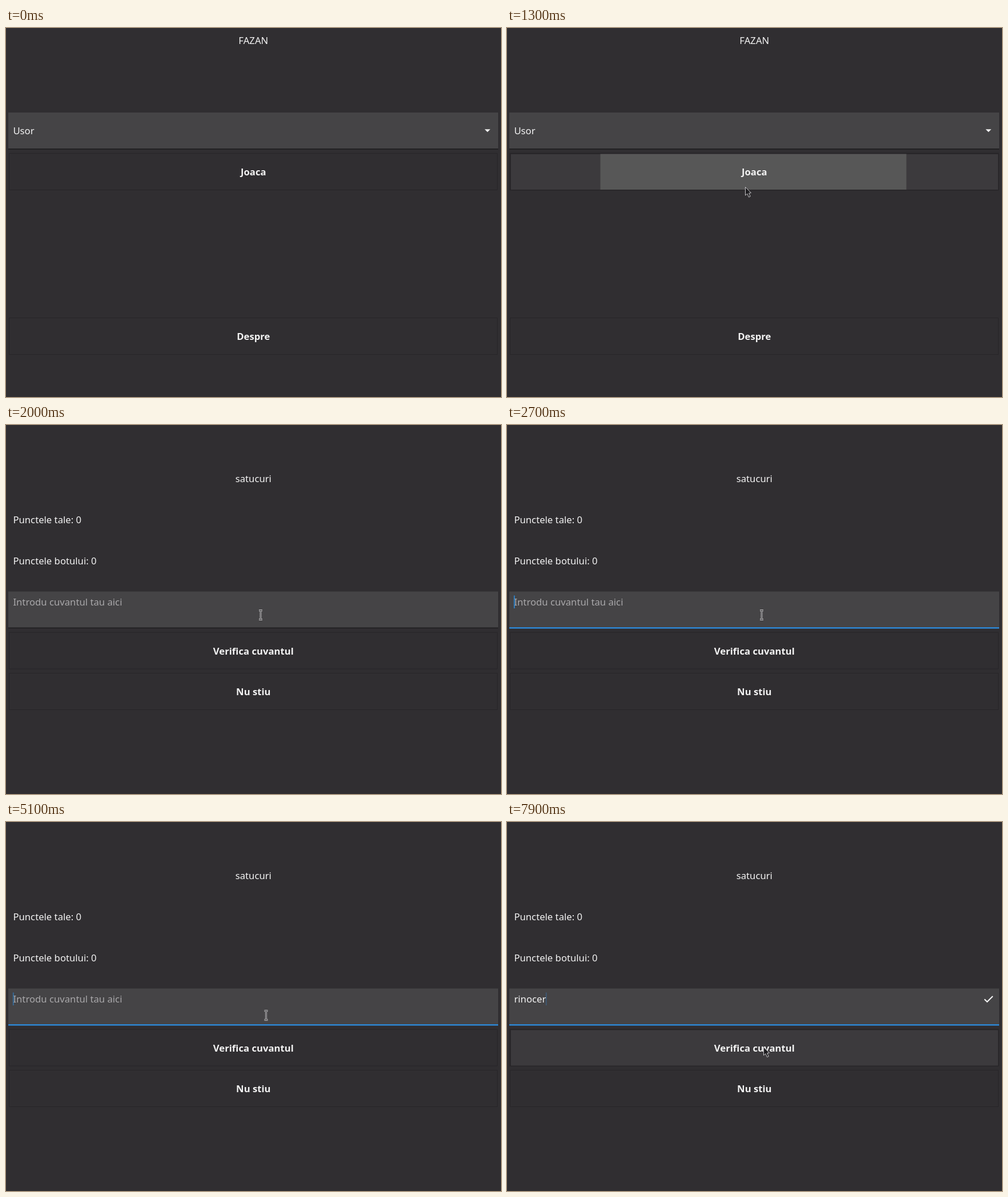
An HTML page with a canvas for the animation above (8 s loop, 867 px wide and 646 px high).

```html
<!DOCTYPE html>
<html lang="ro">
<head>
<meta charset="utf-8">
<title>Joc de cuvinte</title>
<style>
  html, body { margin: 0; width: 100%; height: 100%; overflow: hidden; background: #302e31; }
  canvas { display: block; }
</style>
</head>
<body>
<canvas id="stage" width="867" height="646"></canvas>
<script>
const ctx = document.getElementById('stage').getContext('2d');
const LOOP = 8000, STEP = 100;
const FONT_SIZE = 16.7, TEXT_X = 12.4;
const COLOR = {
  page: '#302e31', field: '#454446', hover: '#3c3a3d', ripple: '#575757',
  border: '#272528', line: '#1e1d1f', text: '#f3f3f3', hint: '#a9a8aa', accent: '#2b90e6'
};

// Pointer stops: [time, x, y]
const POINTER = [
  [300, 538, 429], [900, 417.5, 278.5], [1400, 417.5, 278.5], [2000, 446, 332.5],
  [2700, 446, 332.5], [3100, 455.5, 338.5], [7300, 455.5, 338.5], [7800, 449.5, 394]
];
// Times at which each letter of the word is typed
const WORD = 'rinocer';
const KEYS = [5500, 5800, 6400, 6500, 6600, 6700, 6900];
const GAME_START = 1400, FOCUS = 2300, FADE_RESUME = 7230;

const easeInOut = p => p < 0.5 ? 2 * p * p : 1 - 2 * (1 - p) * (1 - p);

function pointerAt(t) {
  if (t < POINTER[0][0]) return null;
  const next = POINTER.findIndex(stop => stop[0] > t);
  if (next < 0) return POINTER[POINTER.length - 1].slice(1);
  const [t0, x0, y0] = POINTER[next - 1], [t1, x1, y1] = POINTER[next];
  const p = easeInOut((t - t0) / (t1 - t0));
  return [x0 + (x1 - x0) * p, y0 + (y1 - y0) * p];
}

function rect(x, y, w, h, color) {
  ctx.fillStyle = color;
  ctx.fillRect(x, y, w, h);
}

function text(str, baseline, { x = TEXT_X, align = 'left', weight = 400, color = COLOR.text } = {}) {
  ctx.font = `${weight} ${FONT_SIZE}px "Noto Sans", sans-serif`;
  ctx.textAlign = align;
  ctx.fillStyle = color;
  ctx.fillText(str, x, baseline);
}

const centered = (str, baseline, weight) => text(str, baseline, { x: 433.3, align: 'center', weight });

function stroke(path, color, width) {
  ctx.strokeStyle = color;
  ctx.lineWidth = width;
  ctx.stroke(new Path2D(path));
}

function button(label, y, pointer, rippleOn) {
  const hovered = pointer && pointer[1] > y && pointer[1] < y + 65;
  ctx.strokeStyle = COLOR.border;
  ctx.lineWidth = hovered ? 2 : 1;
  ctx.strokeRect(5.5, y + 0.5, 855, 64);
  if (hovered) rect(7, y + 2, 853, 62, COLOR.hover);
  if (rippleOn) rect(163.5, y + 1.5, 536, 62.5, COLOR.ripple);
  centered(label, y + 39, 700);
}

function field(y, focused) {
  rect(4, y, 858, 64, COLOR.field);
  if (focused) rect(4, y + 62.7, 858, 2.2, COLOR.accent);
  else rect(4, y + 63, 858, 1.6, COLOR.line);
}

function caretAlpha(t) {
  const typing = t >= KEYS[0];
  if (typing && t < FADE_RESUME) return 1;
  const start = typing ? FADE_RESUME : 2850;
  const phase = (((t - start) / 500) % 2 + 2) % 2;
  return 1 - 0.91 * easeInOut(phase < 1 ? phase : 2 - phase);
}

function drawPointer([x, y], overField) {
  ctx.save();
  ctx.translate(x, y);
  if (overField) {
    const beam = 'M-3 -8H3M0 -8V8M-3 8H3';
    stroke(beam, '#c4c3c5', 2.8);
    stroke(beam, '#39383a', 1);
  } else {
    const arrow = 'M0 0V14.5L3.3 11.6L6 17.6L8.7 16.4L6.2 10.6L10 10.2Z';
    ctx.fillStyle = '#1d1c1f';
    ctx.fill(new Path2D(arrow));
    stroke(arrow, '#c6c5c8', 1);
  }
  ctx.restore();
}

function drawMenu(t, pointer) {
  centered('FAZAN', 28);
  field(148, false);
  text('Usor', 186);
  ctx.fillStyle = COLOR.text;
  ctx.fill(new Path2D('M838.3 177.3H848.3L843.3 182.2Z'));
  button('Joaca', 219, pointer, t >= 1300);
  button('Despre', 507, pointer);
}

function drawGame(t, pointer) {
  const typed = WORD.slice(0, KEYS.filter(key => key <= t).length);
  centered('satucuri', 100);
  text('Punctele tale: 0', 171.5);
  text('Punctele botului: 0', 244);
  field(291.5, t >= FOCUS);
  if (typed) {
    text(typed, 316);
    stroke('M836.3 310.2L841 314.8L850.8 305', COLOR.text, 2);
  } else {
    text('Introdu cuvantul tau aici', 316, { color: COLOR.hint });
  }
  if (t >= FOCUS) {
    ctx.globalAlpha = caretAlpha(t);
    rect(TEXT_X - 0.5 + ctx.measureText(typed).width, 298.5, 1.8, 22.5, COLOR.accent);
    ctx.globalAlpha = 1;
  }
  button('Verifica cuvantul', 362.5, pointer);
  button('Nu stiu', 434, pointer);
}

function draw(now) {
  const t = Math.floor(now % LOOP / STEP) * STEP;
  const pointer = pointerAt(t);
  const inGame = t >= GAME_START;
  rect(0, 0, 867, 646, COLOR.page);
  (inGame ? drawGame : drawMenu)(t, pointer);
  if (pointer) drawPointer(pointer, inGame && pointer[1] > 291 && pointer[1] < 356);
  requestAnimationFrame(draw);
}
requestAnimationFrame(draw);
</script>
</body>
</html>
```
